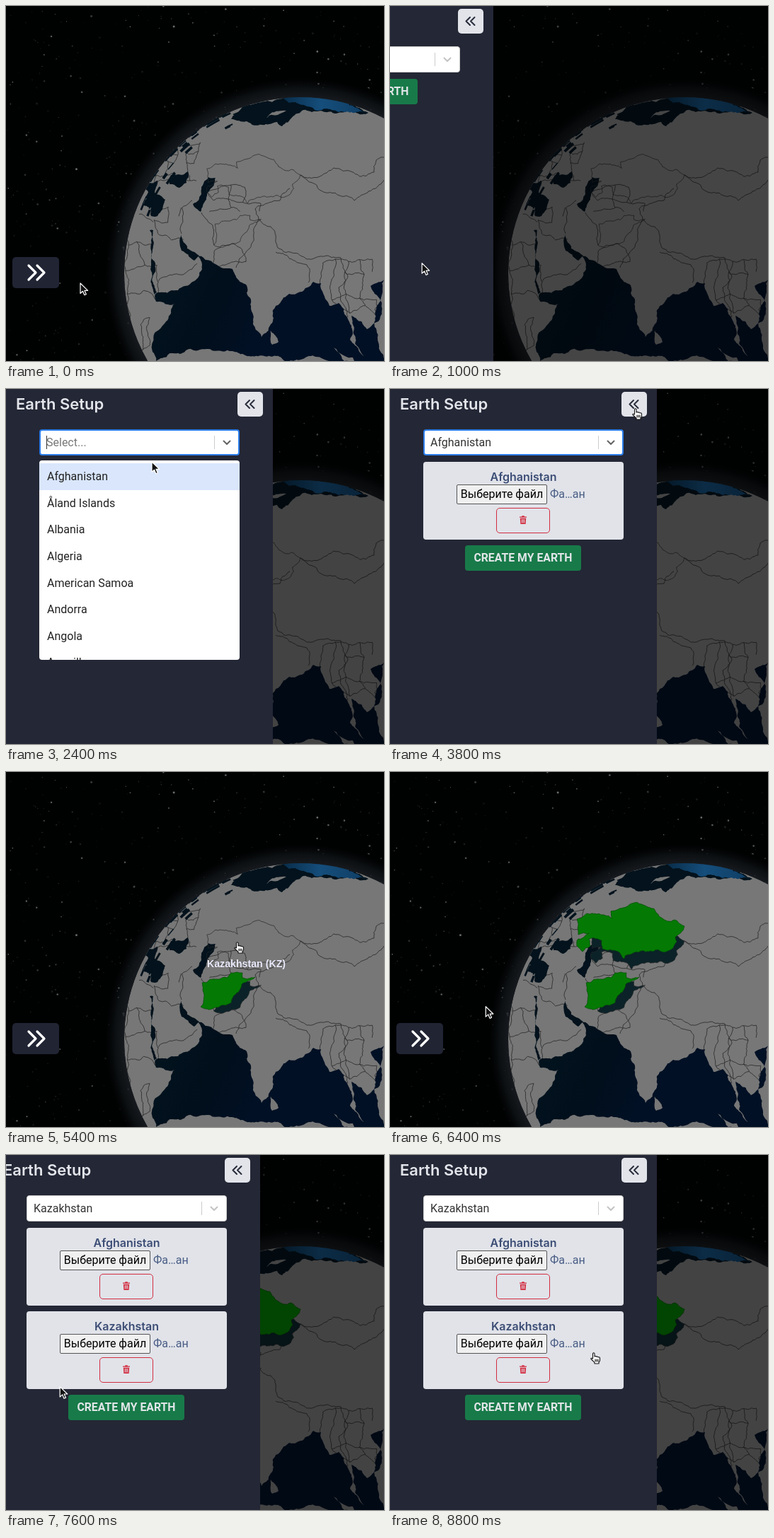
Animation, 534 px wide and 502 px high, one loop 8900 ms. Source, as an HTML page with a canvas:

```html
<!DOCTYPE html>
<html lang="en">
<head>
<meta charset="utf-8">
<title>Earth Setup</title>
<style>
html, body { margin: 0; width: 100%; height: 100%; overflow: hidden; background: #000; }
#stage { position: relative; width: 534px; height: 502px; overflow: hidden; font: 16px/20px Roboto, sans-serif; }
#stage * { box-sizing: border-box; }
#stage div, #stage svg, canvas { position: absolute; }
canvas { left: 0; top: 0; }
svg { overflow: visible; fill: none; stroke-linecap: round; stroke-linejoin: round; }
#open { left: 9px; top: 355px; width: 66px; height: 44px; border-radius: 5px; background: #212433; }
#open.ring { box-shadow: 0 0 0 4px #2a5bb0; }
#dim { inset: 0; background: #000; }
#label { width: 140px; text-align: center; color: #e8e8fa; font: bold 14.2px/20px "Liberation Sans", Arial, sans-serif; white-space: nowrap; }
#panel { left: 0; top: 0; width: 377px; height: 502px; background: #242735; }
#title { left: 14px; top: 7px; font: 600 22px/28px Inter, sans-serif; color: #e3e5eb; white-space: nowrap; }
#close { left: 327px; top: 4px; width: 36px; height: 35px; border-radius: 5px; background: #e2e4ea; }
#select { left: 47px; top: 57px; width: 283px; height: 37px; border-radius: 4px; background: #fff; border: 1px solid #ccc; }
#select.focus { border: 2px solid #2b7ce9; }
#value { left: 57px; top: 66px; color: #333; }
#value.empty { color: #777; }
#caret { left: 57px; top: 66px; width: 1px; height: 19px; background: #333; }
#bar { left: 294px; top: 66px; width: 1px; height: 19px; background: #ccc; }
#menu { left: 47px; top: 101px; width: 283px; height: 282px; border-radius: 4px; background: #fff; overflow: hidden; padding-top: 4px; color: #222; }
#menu p { margin: 0; padding-left: 11px; height: 37.65px; line-height: 37.65px; }
#menu p:first-child { background: #d9e6fc; }
.card { left: 47px; width: 283px; height: 110px; border-radius: 4px; background: #e1e3e9; color: #485c84; }
.name { top: 10px; width: 100%; text-align: center; font: 600 16px/22px Inter, sans-serif; color: #3c4d75; }
.file { left: 47px; top: 32px; width: 128px; height: 28px; border: 1px solid #555; border-radius: 2px; background: #f0f0f0; color: #000; text-align: center; line-height: 26px; white-space: nowrap; }
.none { left: 179px; top: 36px; white-space: nowrap; }
.bin { left: 103px; top: 65px; width: 76px; height: 36px; border: 1.5px solid #d32c40; border-radius: 5px; }
#create { left: 106px; width: 164px; height: 36px; border-radius: 4px; background: #187a49; color: #e1e6e8; font-weight: 700; font-size: 15.8px; line-height: 36px; text-align: center; white-space: nowrap; }
</style>
</head>
<body>
<div id="stage">
  <canvas id="sky" width="534" height="502"></canvas>
  <div id="open"><svg width="66" height="44" stroke="#fff" stroke-width="3.2"><path d="M23 12l10 10-10 10M35 12l10 10-10 10"/></svg></div>
  <div id="label">Kazakhstan (KZ)</div>
  <div id="dim"></div>
  <div id="panel">
    <div id="title">Earth Setup</div>
    <div id="close"><svg width="36" height="35" stroke="#282b39" stroke-width="2"><path d="M17 12l-5.500 5.500 5.500 5.500M23.500 12l-5.500 5.500 5.500 5.500"/></svg></div>
    <div id="select"></div>
    <div id="value"></div>
    <div id="caret"></div>
    <div id="bar"></div>
    <svg id="arrow" style="left:306px;top:72px" width="12" height="8" stroke-width="2"><path d="M1.500 1.500L6 6l4.500-4.500"/></svg>
    <div id="create">CREATE MY EARTH</div>
    <div id="menu"></div>
  </div>
  <svg id="pointer" width="12" height="18"><path fill="#111" stroke="#fff" stroke-width="1.200" d="M0 0V14.500L3.500 11.300 5.800 16.700 8.300 15.600 6 10.400H10.600Z"/></svg>
  <svg id="hand" width="15" height="17"><path fill="#fff" stroke="#111" stroke-width="1.100" d="M3.500 9V1.800Q4.700-.2 6 1.800V6Q7.500 4.700 8.500 6.300 10 5.300 11 6.900 13.500 6.400 13.500 8.500V11.500Q13 13.500 12 14V16H6V14.300L1 9.500Q.5 7.300 3.500 9ZM7 10V13M9 10V13M11 10V13"/></svg>
</div>
<script>
const LOOP = 8900, CX = 416, CY = 378, R = 249, LIFT = 1.15;
const LAND = '#777', SEA = '#03121c', LINE = '#262626';
const $ = id => document.getElementById(id);
const clamp = v => Math.max(0, Math.min(1, v));
const smooth = v => (v = clamp(v), v * v * (3 - 2 * v));
const ctx = $('sky').getContext('2d');

let seed = 7;
const rnd = () => (seed = seed * 16807 % 2147483647) / 2147483647;
const spread = (v, size) => v + (rnd() - .5) * size;

// Midpoint displacement gives coasts and borders their detail.
function ragged(path, [x0, y0], [x1, y1]) {
  const d = Math.hypot(x1 - x0, y1 - y0);
  if (d < 4) return path.lineTo(x1, y1);
  const mid = [spread((x0 + x1) / 2, d * .28), spread((y0 + y1) / 2, d * .28)];
  ragged(path, [x0, y0], mid);
  ragged(path, mid, [x1, y1]);
}

function outline(text, closed = true) {
  const pts = text.split(' ').map(p => p.split(',').map(Number));
  const path = new Path2D();
  path.moveTo(...pts[0]);
  pts.slice(1).forEach((p, i) => ragged(path, pts[i], p));
  if (closed) ragged(path, pts.at(-1), pts[0]);
  return path;
}

// A loose mesh of small borders over a box.
function mesh(x, y, w, h, cols, rows) {
  const path = new Path2D(), dx = w / cols, dy = h / rows;
  const nodes = Array.from({ length: rows + 1 }, (_, r) =>
    Array.from({ length: cols + 1 }, (_, c) => [spread(x + c * dx, dx * .7), spread(y + r * dy, dy * .7)]));
  const link = (a, b) => {
    if (!b || rnd() < .2) return;
    path.moveTo(...a);
    ragged(path, a, b);
  };
  nodes.forEach((row, r) => row.forEach((p, c) => {
    link(p, row[c + 1]);
    link(p, nodes[r + 1]?.[c]);
  }));
  return path;
}

const arctic = outline('318,160 336,140 400,120 470,125 512,151 470,151 440,149 412,152 390,170 383,164 340,163');
const ice = outline('382,125 450,125 510,150 470,150 436,147 400,137');
const ocean = outline('211,407 243,402 272,383 277,366 269,352 292,363 320,372 327,386 340,395 346,428 361,468 374,450 377,430 400,407 434,390 445,392 457,424 470,420 482,440 486,472 506,495 491,460 488,438 503,447 510,457 526,446 530,418 515,396 534,387 534,502 212,502 206,480 219,455 238,421 212,418');
const islands = ['374,459 385,475 376,479', '463,483 490,497 492,502 478,502', '368,158 396,148 384,154'].map(p => outline(p));
const lakes = [
  '233,239 257,234 255,250 245,257 231,252',
  '296,243 286,242 276,256 276,266 264,280 275,291 284,268',
  '203,250 214,247 210,264 225,274 214,297 205,297 205,285 194,280',
  '203,317 208,317 213,405 209,408',
  '247,323 256,343 273,353 266,360 248,346'
].map(p => outline(p));
const borders = [
  '416,239 453,236 463,229 500,241 520,235 523,218 534,214',
  '416,239 443,260 492,275 512,262 534,246',
  '401,258 387,275 352,287 357,301 374,312 384,342 425,358 455,353 473,356 483,383 478,390 470,398 483,440',
  '381,348 412,363 425,366 427,391',
  '357,301 350,328 330,357 325,370',
  '248,322 249,285 263,275',
  '294,338 292,310 276,292',
  '214,390 250,380 270,364'
].map(p => outline(p, false));
borders.push(
  mesh(195, 195, 75, 55, 5, 4),
  mesh(172, 300, 36, 180, 2, 5),
  mesh(212, 284, 34, 40, 2, 2),
  mesh(290, 258, 65, 32, 3, 2),
  mesh(300, 340, 30, 20, 1, 1),
  mesh(445, 360, 75, 72, 4, 3)
);

// Outlines of the raised shapes; the footprint is the same path scaled down.
const country = {
  Afghanistan: outline('277,298 312,291 318,284 334,284 334,291 352,290 333,300 318,326 293,334 275,332'),
  Kazakhstan: outline('264,208 278,200 314,207 312,197 358,188 392,211 402,209 416,218 403,233 405,240 390,254 345,255 330,264 317,252 300,250 299,238 281,236 283,246 272,254 264,246 266,236 281,228 266,230')
};

const stars = Array.from({ length: 800 }, () => [rnd() * 534, rnd() * 502, .4 + rnd() ** 3 * 1.2, .1 + rnd() ** 2 * .5]);
// Foreshortened inlets near the upper-left limb.
const inlets = Array.from({ length: 34 }, () => {
  const a = Math.PI * (1.1 + rnd() * .29);
  return [R * (1 - rnd() ** 2 * .1), a, a + .03 + rnd() * .06, 1 + rnd() * 3];
});

function gradient(g, ...stops) {
  stops.forEach((c, i) => g.addColorStop(i / (stops.length - 1), c));
  return g;
}
const halo = gradient(ctx.createRadialGradient(CX, CY, R - 2, CX, CY, R + 27), 'rgba(34,38,44,.7)', 'rgba(24,28,33,.55)', 'rgba(10,12,15,0)');
const deep = gradient(ctx.createLinearGradient(220, 410, 350, 470), '#02131e', '#010e1b', '#011024');
const north = gradient(ctx.createLinearGradient(380, 0, 510, 0), '#06263f', '#154e7c', '#0f3d63');

const fill = (path, style) => { ctx.fillStyle = style; ctx.fill(path); };
const disc = (x, y, r, style) => { ctx.fillStyle = style; ctx.beginPath(); ctx.arc(x, y, r, 0, 7); ctx.fill(); };

function drawCountry(path, lift) {
  const at = (scale, body, edge) => {
    ctx.save();
    ctx.translate(CX, CY);
    ctx.scale(scale, scale);
    ctx.translate(-CX, -CY);
    if (lift > 0) fill(path, body);
    ctx.strokeStyle = edge;
    ctx.stroke(path);
    ctx.restore();
  };
  at(1 / LIFT, '#0b2228', LINE);
  if (lift > 0) at((1 + (LIFT - 1) * lift) / LIFT, '#047a04', '#045204');
}

function drawGlobe(lifts) {
  ctx.fillStyle = '#000202';
  ctx.fillRect(0, 0, 534, 502);
  for (const [x, y, r, a] of stars) disc(x, y, r, `rgba(185,192,192,${a})`);
  disc(CX, CY, R + 27, halo);
  ctx.save();
  ctx.beginPath();
  ctx.arc(CX, CY, R, 0, 7);
  ctx.clip();
  disc(CX, CY, R, LAND);
  ctx.lineWidth = .8;
  ctx.strokeStyle = LINE;
  for (const b of borders) ctx.stroke(b);
  fill(arctic, SEA);
  fill(ice, north);
  fill(ocean, deep);
  for (const l of lakes) fill(l, SEA);
  for (const i of islands) fill(i, LAND);
  ctx.strokeStyle = SEA;
  for (const [r, from, to, width] of inlets) {
    ctx.lineWidth = width;
    ctx.beginPath();
    ctx.arc(CX, CY, r, from, to);
    ctx.stroke();
  }
  ctx.restore();
  ctx.lineWidth = .8;
  for (const name in country) drawCountry(country[name], lifts[name]);
}

$('menu').innerHTML = ['Afghanistan', 'Åland Islands', 'Albania', 'Algeria', 'American Samoa', 'Andorra', 'Angola', 'Anguilla']
  .map(n => `<p>${n}</p>`).join('');

const cards = Object.keys(country).map((name, i) => {
  const el = document.createElement('div');
  el.className = 'card';
  el.style.top = 103 + i * 118 + 'px';
  el.innerHTML = `<div class="name">${name}</div><div class="file">Выберите файл</div><div class="none">Фа…ан</div>
    <div class="bin"><svg style="left:32px;top:10px" width="10" height="12"><path fill="#d32c40" d="M0 1.500H3L3.500 .3H6.500L7 1.500H10V2.800H0ZM.8 3.800H9.200L8.600 12H1.400Z"/><path stroke="#e1e3e9" stroke-width=".9" d="M3.200 5.500V10M5 5.500V10M6.800 5.500V10"/></svg></div>`;
  $('panel').insertBefore(el, $('menu'));
  return el;
});

// Cursor moves: start, end, x, y.
const moves = [
  [0, 500, 36, 381], [900, 1500, 159, 147], [1600, 2100, 206, 103], [2400, 2700, 192, 127], [3300, 3800, 342, 27],
  [4200, 5400, 322, 240], [5700, 6800, 55, 371], [7300, 8300, 153, 170], [8300, 8800, 283, 279]
];
const cursorAt = t => moves.reduce(([x, y], [from, to, tx, ty]) => {
  const f = smooth((t - from) / (to - from));
  return [x + (tx - x) * f, y + (ty - y) * f];
}, [105, 392]);

const within = (t, a, b) => t >= a && t < b;

// Drawer: spring in, quick ease out.
function drawer(t) {
  if (within(t, 4200, 7242)) {
    const left = 1 - smooth((t - 4200) / 250);
    return [left, left];
  }
  const since = Math.max(0, t - (t < 4200 ? 900 : 7242));
  const w = since * .0134;
  return [1 - (1 + w) * Math.exp(-w), 1 - (1 - clamp(since / 150)) ** 3];
}

const show = (el, on) => { el.style.display = on ? '' : 'none'; };
const move = (el, x, y) => { el.style.transform = `translate(${x}px,${y}px)`; };

function render(t) {
  const [slide, dim] = drawer(t);
  const picked = t >= 2700, second = t >= 5800;
  const menu = within(t, 1900, 2700), focus = within(t, 1800, 4300);
  drawGlobe({ Afghanistan: smooth((t - 2600) / 900), Kazakhstan: smooth((t - 5700) / 700) });

  move($('panel'), Math.round((slide - 1) * 377), 0);
  show($('panel'), slide > 0);
  $('dim').style.opacity = dim * .44;
  $('open').className = t >= 7100 ? 'ring' : '';

  $('select').className = focus ? 'focus' : '';
  $('arrow').style.stroke = focus ? '#666' : '#c4c4c4';
  $('value').textContent = second ? 'Kazakhstan' : picked ? 'Afghanistan' : 'Select...';
  $('value').className = picked ? '' : 'empty';
  show($('caret'), menu);
  show($('menu'), menu);
  show(cards[0], picked);
  show(cards[1], second);
  $('create').style.top = 103 + 118 * (picked + second) + 'px';

  const [x, y] = cursorAt(t);
  const onGlobe = Math.hypot(x - CX, y - CY) < R;
  const onButton = x < 75 && within(y, 355, 399);
  const hand = slide > 0 ? (x > 320 && y < 40) || t >= 8500 : onGlobe || onButton;
  show($('hand'), hand);
  show($('pointer'), !hand);
  move($('hand'), x, y);
  move($('pointer'), x, y);
  show($('label'), within(t, 5200, 5900));
  move($('label'), x - 52.5, y + 21);
}

let last = -1;
function tick(now) {
  const t = Math.floor(now % LOOP / 100) * 100;
  if (t !== last) render(last = t);
  requestAnimationFrame(tick);
}
tick(performance.now());
</script>
</body>
</html>
```
